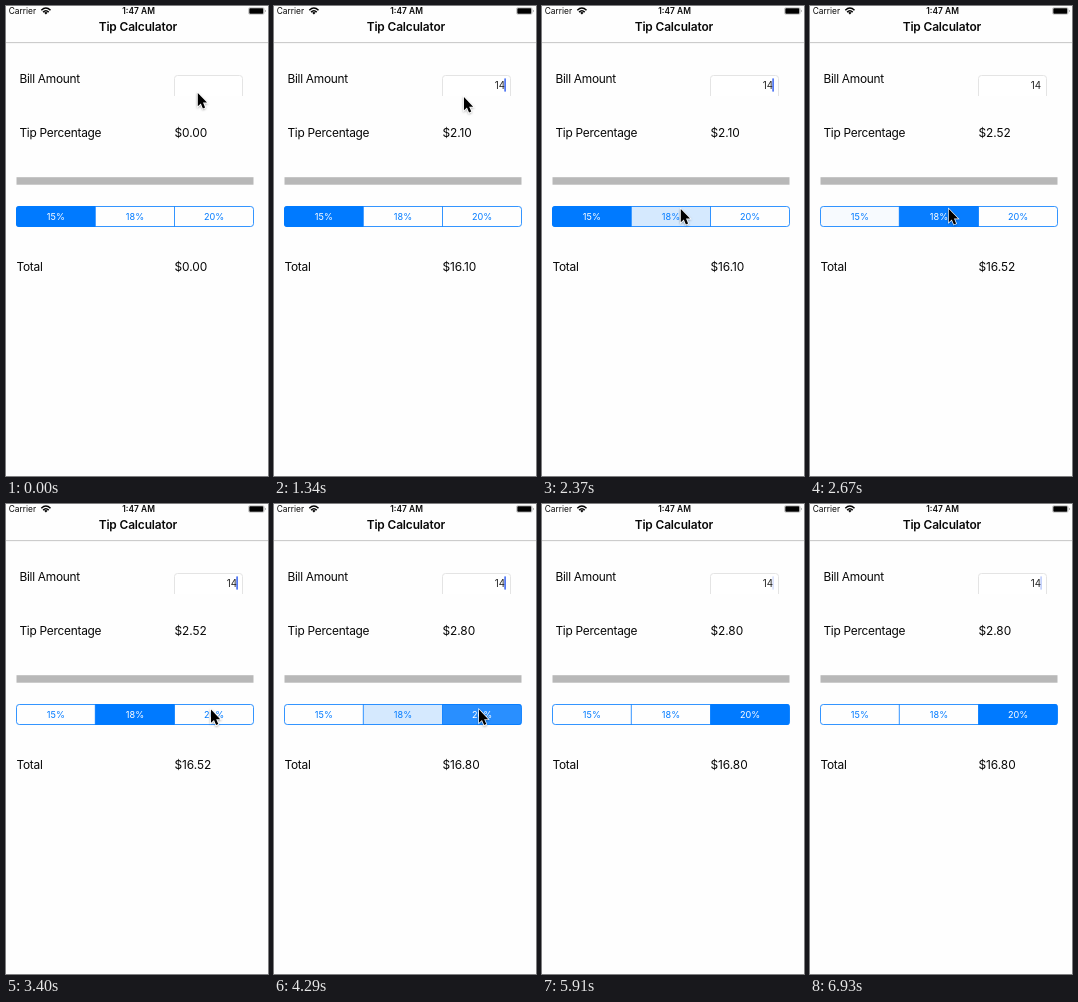
Recreate the animation shown at these times as an HTML page. Size 262 by 470 pixels, loop 7.03 s.

```html
<!DOCTYPE html>
<html lang="en">
<head>
<meta charset="utf-8">
<title>Tip Calculator</title>
<style>
  html, body { margin: 0; width: 100%; height: 100%; overflow: hidden; background: #fefefe; }
  svg { display: block; width: 262px; height: 470px; }
  text { font-family: Inter, Roboto, sans-serif; font-size: 11.9px; fill: #080808; }
  .label { letter-spacing: -.26px; }
  .money { letter-spacing: -.04px; }
  .status { font-size: 8.4px; }
  .bold { font-weight: 600; }
  .title { letter-spacing: -.13px; }
  .mid { text-anchor: middle; }
  .segment { font-size: 9.1px; }
  #bill { font-size: 9.8px; text-anchor: end; fill: #222; }
</style>
</head>
<body>
<svg viewBox="0 0 262 470">
  <defs>
    <clipPath id="control"><rect x="10" y="200" width="238" height="21" rx="3"/></clipPath>
    <filter id="shadow" x="-50%" y="-50%" width="200%" height="200%">
      <feDropShadow dx="0" dy="1" stdDeviation=".8" flood-opacity=".35"/>
    </filter>
  </defs>

  <text class="status" x="2.7" y="8">Carrier</text>
  <g fill="none" stroke="#000" stroke-width="1.5">
    <path d="M35.3 4.2Q39.9 -.1 44.5 4.2M37.1 6.1Q39.9 3.5 42.7 6.1"/>
    <path d="M38.2 6.8Q39.9 5.4 41.6 6.8L39.9 8.6Z" fill="#000" stroke="none"/>
  </g>
  <text class="status bold mid" x="132.6" y="8">1:47 AM</text>
  <rect x="242.5" y="1.7" width="15.6" height="6.6" rx="1.4" fill="none" stroke="#aaa" stroke-width=".6"/>
  <rect x="243.3" y="2.3" width="14" height="5.4" rx=".8"/>
  <path d="M259 3.7Q260.6 5 259 6.3Z" fill="#777"/>
  <text class="title bold mid" x="131.9" y="25">Tip Calculator</text>
  <rect y="36.3" width="262" height=".8" fill="#b8b8b8"/>

  <text class="label" x="13.4" y="76.5">Bill Amount</text>
  <path d="M168.5 90V72.5Q168.5 69.5 171.5 69.5H233.5Q236.5 69.5 236.5 72.5V90" fill="#fff" stroke="#e4e4e4"/>
  <text id="bill" x="231" y="83"></text>
  <rect id="caret" x="230.3" y="72.3" width="1.6" height="13.4" rx=".6" fill="#426bf2"/>

  <text class="label" x="13.4" y="130.8">Tip Percentage</text>
  <text class="money" id="tip" x="168.4" y="130.8"></text>
  <rect x="10.5" y="171.2" width="237" height="7.5" fill="#b8b8b8"/>

  <g id="segments" clip-path="url(#control)"></g>
  <path d="M89.3 200.5V220.5M168.5 200.5V220.5" stroke="#007aff" stroke-width=".8"/>
  <rect x="10.5" y="200.5" width="237" height="20" rx="2.8" fill="none" stroke="#007aff" stroke-width=".8"/>

  <text class="label" x="10.5" y="264.6">Total</text>
  <text class="money" id="total" x="168.4" y="264.6"></text>

  <path id="cursor" d="M0 0V13.2L3 10.5L5.1 15.5L7.3 14.5L5.2 9.6H9.2Z"
    stroke="#fff" stroke-width="1.3" paint-order="stroke" filter="url(#shadow)"/>
</svg>
<script>
const LOOP = 7030, FRAME = 147.5;
const BLUE = '#007aff', TINT = .16;
const RATES = [15, 18, 20];
const HOLD = 2; // frames a finger rests on a segment before it is selected
const taps = [{ frame: 15, segment: 1 }, { frame: 27, segment: 2 }];
const moves = [
  { start: 1220, end: 2180, from: [191.8, 87], to: [138.8, 203] },
  { start: 2815, end: 3350, from: [138.8, 203], to: [205, 205.6] }
];
const HIDE_CURSOR = 5150;

const $ = id => document.getElementById(id);
const clamp = v => Math.min(1, Math.max(0, v));
const smooth = p => p * p * (3 - 2 * p);
const money = amount => '$' + amount.toFixed(2);

function add(parent, tag, attrs) {
  const el = document.createElementNS('http://www.w3.org/2000/svg', tag);
  for (const name in attrs) el.setAttribute(name, attrs[name]);
  return parent.appendChild(el);
}

const segments = RATES.map((percent, i) => {
  const x = 10 + i * 79.2;
  const rect = add($('segments'), 'rect', { x, y: 200, width: 79.2, height: 21, fill: BLUE });
  const label = add($('segments'), 'text', { x: x + 39.8, y: 213.7, class: 'segment mid' });
  label.textContent = percent + '%';
  return { rect, label };
});

function control(frame) {
  const fills = [1, 0, 0];
  let selected = 0;
  for (const { frame: down, segment } of taps) {
    const age = frame - down;
    if (age < 0) break;
    if (age < HOLD) {
      fills[segment] = TINT;
    } else {
      const rest = TINT ** (age - HOLD + 1);
      fills[selected] = rest;
      fills[segment] = 1 - rest;
      selected = segment;
    }
  }
  return { fills, selected };
}

// The caret fades out around regularly spaced dark moments once typing stops.
function caretOpacity(t) {
  if (t < FRAME) return 0;
  if (t < 1200) return 1;
  const period = 1017, dark = 1640;
  const cycles = (t - dark) / period;
  const distance = Math.abs(cycles - Math.round(cycles)) * period;
  return clamp((distance - 170) / 110);
}

function cursorAt(t) {
  const move = moves.findLast(m => t >= m.start) || moves[0];
  const p = smooth(clamp((t - move.start) / (move.end - move.start)));
  return move.from.map((v, axis) => v + (move.to[axis] - v) * p);
}

function draw(time) {
  const frame = Math.floor(time / FRAME + .03);
  const t = frame * FRAME;
  const { fills, selected } = control(frame);
  const typed = '14'.slice(0, Math.floor((frame - 1) / 3));
  const amount = frame < 4 ? 0 : Number(typed);
  const tip = amount * RATES[selected] / 100;

  $('bill').textContent = amount || '';
  $('tip').textContent = money(tip);
  $('total').textContent = money(amount + tip);
  $('caret').style.opacity = caretOpacity(t);

  segments.forEach(({ rect, label }, i) => {
    rect.style.opacity = fills[i];
    label.style.fill = fills[i] > .5 ? '#fff' : BLUE;
  });

  $('cursor').style.display = t < HIDE_CURSOR ? '' : 'none';
  $('cursor').setAttribute('transform', `translate(${cursorAt(t)})`);
}

const begin = performance.now();
function tick() {
  draw((performance.now() - begin) % LOOP);
  requestAnimationFrame(tick);
}
tick();
</script>
</body>
</html>
```
